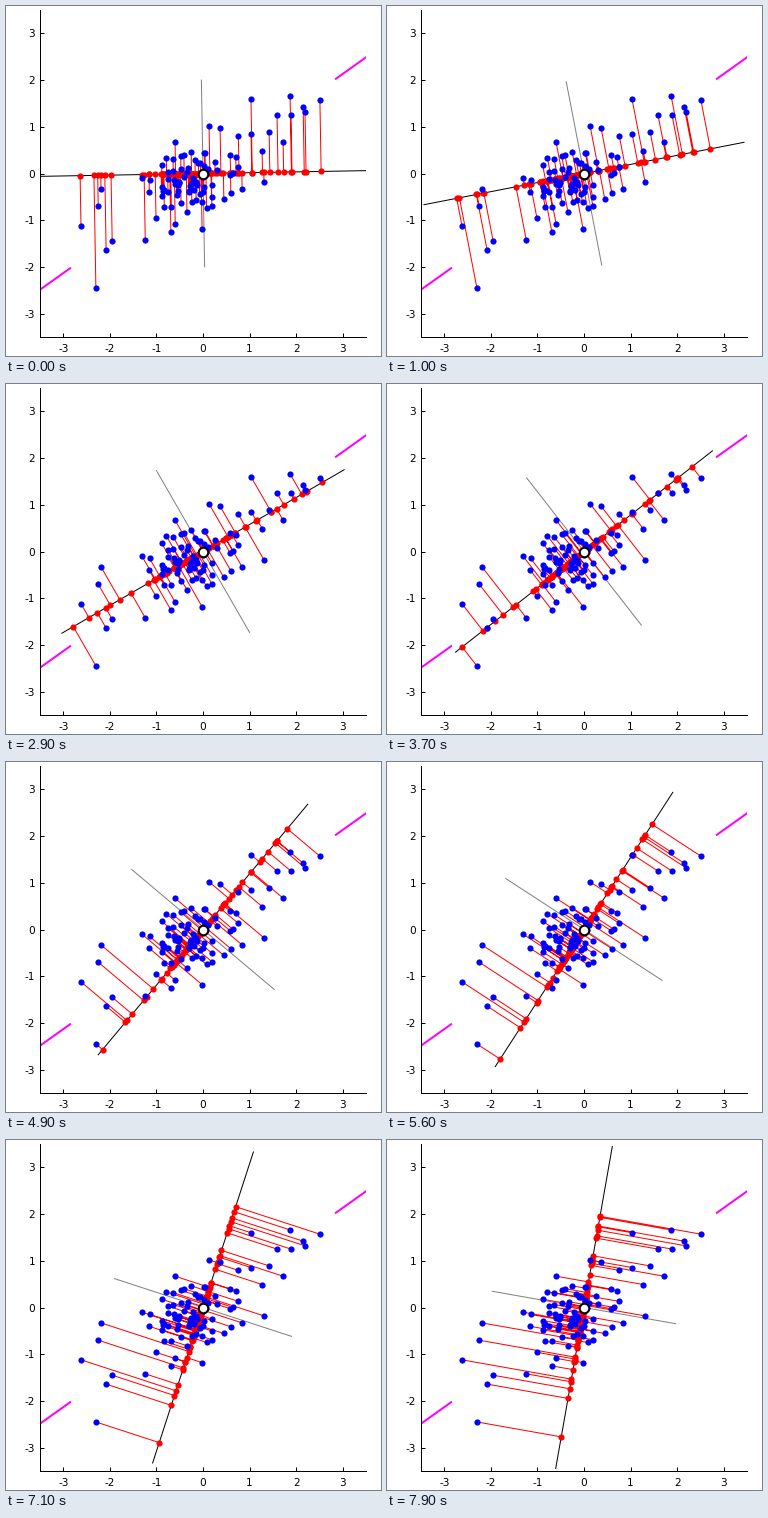
These frames come from a looping animation (375 by 350 pixels, 8 s). A matplotlib script:

```python
import numpy as np
import matplotlib.pyplot as plt
from matplotlib.animation import FuncAnimation

PX = 0.72  # points per pixel at 100 dpi
W, H = 375, 350
LIMIT = 3.5
FRAMES = 80
TREND = 35.4  # degrees, principal direction of the cloud

plt.rcParams["font.family"] = "DejaVu Sans"
plt.rcParams["axes.unicode_minus"] = False


def direction(degrees):
    a = np.radians(degrees)
    return np.array([np.cos(a), np.sin(a)])


def make_cloud(n=74, seed=8):
    """A seeded core stretched along the trend, plus the outlying points."""
    rng = np.random.default_rng(seed)
    along = rng.triangular(-1.65, -0.3, 1.6, n)
    across = rng.triangular(-0.85, 0, 0.85, n)
    core = np.outer(along, direction(TREND))
    core += np.outer(across, direction(TREND + 90))
    outer = [
        (-2.62, -1.12), (-2.19, -0.33), (-2.25, -0.70), (-2.30, -2.45),
        (-2.08, -1.64), (-1.95, -1.45), (-1.24, -1.42), (-1.31, -0.10),
        (-0.69, -1.25), (-0.02, -1.18), (-0.60, 0.67), (0.13, 1.02),
        (0.84, -0.33), (1.31, -0.18), (1.03, 1.60), (1.42, 0.89),
        (1.59, 1.25), (1.72, 0.67), (1.87, 1.66), (1.89, 1.25),
        (2.15, 1.42), (2.19, 1.32), (2.51, 1.57),
    ]
    return np.vstack([core, outer])


points = make_cloud()

fig = plt.figure(figsize=(W / 100, H / 100), dpi=100, facecolor="white")
ax = fig.add_axes([34 / W, 19 / H, 326 / W, 327 / H])
ax.set(xlim=(-LIMIT, LIMIT), ylim=(-LIMIT, LIMIT),
       xticks=range(-3, 4), yticks=range(-3, 4))
ax.tick_params(direction="in", length=4 * PX, width=PX, pad=5 * PX,
               labelsize=10.5 * PX)
ax.tick_params(axis="x", pad=7 * PX)
for side, spine in ax.spines.items():
    spine.set_linewidth(PX)
    spine.set_visible(side in ("left", "bottom"))


def line(color, z, width=1):
    return ax.plot([], [], color=color, lw=width * PX, zorder=z)[0]


def dots(color, z):
    return ax.plot([], [], "o", color=color, ms=6.2 * PX, mew=0, zorder=z)[0]


normal = line("0.5", 2)
axis_line = line("black", 2)
sticks = line("red", 3)
shadows = dots("red", 4)
dots("blue", 5).set_data(*points.T)
ax.plot(0, 0, "o", mfc="white", mec="black", ms=9.5 * PX, mew=2 * PX, zorder=6)

# The trend is marked only outside the swept circle.
for sign in (-1, 1):
    ends = [sign * LIMIT, sign * 5]
    line("magenta", 2, 2).set_data(*np.outer(direction(TREND), ends))


def update(i):
    angle = i + 1
    w = direction(angle)
    proj = np.outer(points @ w, w)
    gap = np.full_like(points, np.nan)
    sticks.set_data(*np.stack([points, proj, gap], axis=1).reshape(-1, 2).T)
    shadows.set_data(*proj.T)
    axis_line.set_data(*np.outer(w, [-LIMIT, LIMIT]))
    normal.set_data(*np.outer(direction(angle + 90), [-2, 2]))
    return sticks, shadows, axis_line, normal


anim = FuncAnimation(fig, update, frames=FRAMES, interval=100,
                     repeat=True, repeat_delay=0)
plt.show()
```
